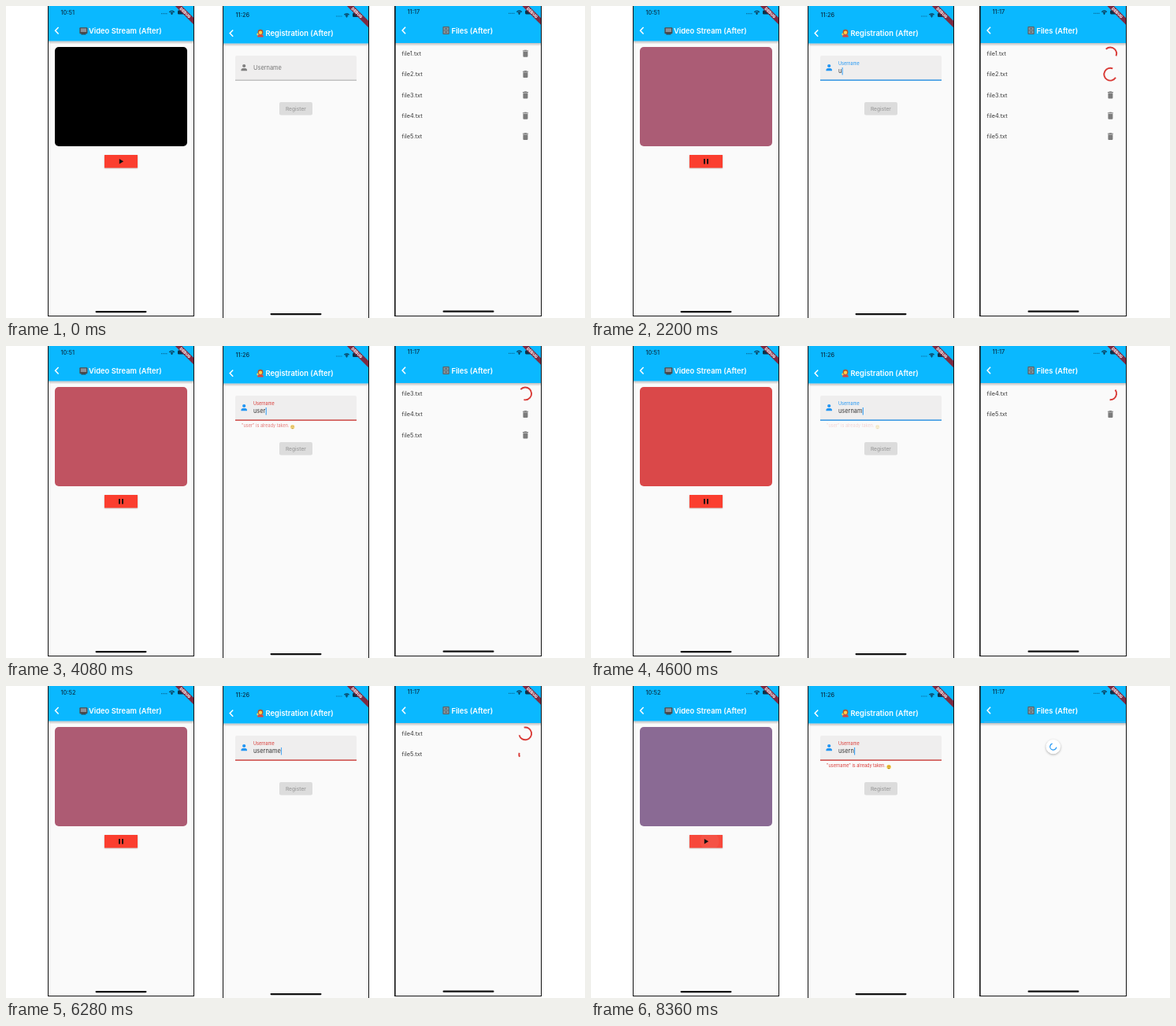
An HTML page with a canvas for the animation above (8.4 s loop, 735 px wide and 396 px high).

```html
<!DOCTYPE html>
<html lang="en">
<head>
<meta charset="utf-8">
<title>Three app screens</title>
<style>
html, body { margin: 0; width: 100%; height: 100%; overflow: hidden; background: #fff; }
canvas { display: block; width: 735px; height: 396px; }
</style>
</head>
<body>
<canvas id="stage"></canvas>
<script>
const W = 735, H = 396, LOOP = 8400;
const TAU = Math.PI * 2;
const BAR = '#0ab8ff', BLUE = '#2196f3', RED = '#d93a36', INK = '#0b3149';
const canvas = document.getElementById('stage');
const g = canvas.getContext('2d');
const dpr = window.devicePixelRatio || 1;
canvas.width = W * dpr;
canvas.height = H * dpr;

const clamp = (v, a = 0, b = 1) => Math.min(b, Math.max(a, v));
const mix = (a, b, k) => a + (b - a) * k;
const ramp = (t, from, to) => clamp((t - from) / (to - from));
const smooth = k => k * k * (3 - 2 * k);
const window01 = (t, from, to, fade) => Math.min(ramp(t, from, from + fade), 1 - ramp(t, to, to + fade));

// cubic-bezier(.4, 0, .2, 1)
function ease(x) {
  let lo = 0, hi = 1;
  for (let i = 0; i < 20; i++) {
    const s = (lo + hi) / 2;
    const bx = 1.2 * s * (1 - s) ** 2 + .6 * s * s * (1 - s) + s ** 3;
    if (bx < x) lo = s; else hi = s;
  }
  return 3 * lo * lo * (1 - lo) + lo ** 3;
}

function rect(x, y, w, h, color, r = 0) {
  g.fillStyle = color;
  g.beginPath();
  g.roundRect(x, y, w, h, r);
  g.fill();
}

function disc(x, y, r, color) {
  g.fillStyle = color;
  g.beginPath();
  g.arc(x, y, r, 0, TAU);
  g.fill();
}

function poly(points, color) {
  g.fillStyle = color;
  g.beginPath();
  points.forEach(([x, y]) => g.lineTo(x, y));
  g.closePath();
  g.fill();
}

function text(s, x, y, size, color, weight = 400, align = 'left') {
  g.font = `${weight} ${size}px Inter, Roboto, sans-serif`;
  g.textAlign = align;
  g.textBaseline = 'alphabetic';
  g.fillStyle = color;
  g.fillText(s, x, y);
  return g.measureText(s).width;
}

function withAlpha(a, draw) {
  if (a <= 0) return;
  g.save();
  g.globalAlpha *= a;
  draw();
  g.restore();
}

// Material indeterminate progress ring
function spinner(x, y, r, width, color, age) {
  const u = (age / 1333) % 1, arc = Math.PI * 1.5;
  const head = ease(clamp(u * 2)) * arc;
  const tail = ease(clamp(u * 2 - 1)) * arc;
  const start = -Math.PI / 2 + tail + age / 2222 * TAU + u * Math.PI / 2;
  g.strokeStyle = color;
  g.lineWidth = width;
  g.beginPath();
  g.arc(x, y, r, start, start + Math.max(head - tail, .01));
  g.stroke();
}

function tvIcon(x, y) {
  rect(x, y + 1, 10, 8, '#4b4a4d', 1);
  rect(x + 1.4, y + 2.2, 7.2, 4.6, '#8b9097');
  rect(x + 2, y + 9, 6, 1.2, '#39393b');
}

function personIcon(x, y) {
  disc(x + 5, y + 3.6, 3.4, '#b5532b');
  disc(x + 5, y + 4.2, 2.2, '#ffcf4a');
  rect(x + 1.4, y + 6.6, 7.2, 3.4, '#d9473f', [2, 2, 0, 0]);
  rect(x + .4, y + 5, 2, 2.6, '#ffcf4a', 1);
}

function cabinetIcon(x, y) {
  rect(x + .6, y, 8.4, 10, '#55626a', 1);
  rect(x + 1.8, y + 1.2, 6, 3.4, '#8c9aa1');
  rect(x + 1.8, y + 5.4, 6, 3.4, '#8c9aa1');
  rect(x + 3.6, y + 2.4, 2.4, 1, '#39444a');
  rect(x + 3.6, y + 6.6, 2.4, 1, '#39444a');
}

function phone(p, body) {
  const { x, w, bottom, bar, dy } = p;
  g.save();
  g.beginPath();
  g.rect(x, 0, w, bottom);
  g.clip();
  rect(x, 0, w, bottom, '#fafafa');
  body();

  const shade = g.createLinearGradient(0, bar, 0, bar + 4);
  shade.addColorStop(0, 'rgba(0,0,0,.24)');
  shade.addColorStop(1, 'rgba(0,0,0,0)');
  rect(x, bar, w, 4, shade);
  rect(x, 0, w, bar, BAR);

  text(p.clock, x + 16.5, 10.5 + dy, 7.4, INK, 500);
  const right = x + w;
  for (let i = 0; i < 4; i++) rect(right - 42 + i * 2.1, 9 + dy, 1.2, 1.2, 'rgba(11,49,73,.55)');
  g.strokeStyle = INK;
  g.lineWidth = 1.2;
  for (const r of [2.2, 4.2]) {
    g.beginPath();
    g.arc(right - 28.5, 10.6 + dy, r, -Math.PI * .77, -Math.PI * .23);
    g.stroke();
  }
  disc(right - 28.5, 10.2 + dy, .9, INK);
  rect(right - 21, 5.6 + dy, 10, 5, INK, 1.3);

  g.strokeStyle = '#fff';
  g.lineWidth = 1.5;
  g.beginPath();
  g.moveTo(p.back + 4.6, 27 + dy);
  g.lineTo(p.back + .6, 31.2 + dy);
  g.lineTo(p.back + 4.6, 35.4 + dy);
  g.stroke();
  p.icon(p.titleX - 11.6, 26.2 + dy);
  text(p.title, p.titleX, 34.7 + dy, 9.35, '#fff', 600);

  g.save();
  g.translate(p.ribbon + 8.5, 8.5);
  g.rotate(Math.PI / 4);
  rect(-30, -3, 60, 6, '#7d2b42');
  text('DEBUG', 0, 1.8, 5, '#fff', 800, 'center');
  g.restore();

  rect(p.home, p.homeY, 65, 2.2, '#111', 1.1);
  g.restore();

  rect(x, 0, p.edge, bottom, '#111');
  rect(right - 1, 0, 1, bottom, '#111');
  rect(x, bottom - 1, w, 1, '#111');
}

// Video stream: tap intervals and tint between purple (0) and red (1)
const taps = [[1120, 1400], [2320, 2480], [3110, 3400], [7980, 8160]];
const tint = [[1480, 1], [2480, .22], [3400, .22], [4650, .9], [5700, 0], [7050, 1], [8160, 0], [8400, 0]];

function videoColor(t) {
  if (t < tint[0][0]) return '#000';
  const i = tint.findIndex(k => k[0] > t);
  const [a, b] = [tint[i - 1], tint[i]];
  const k = mix(a[1], b[1], smooth(ramp(t, a[0], b[0])));
  return `rgb(${mix(138, 227, k)},${mix(106, 68, k)},${mix(148, 64, k)})`;
}

function video(t) {
  rect(62, 52, 168, 126, videoColor(t), 5);
  const tap = taps.find(([a, b]) => t >= a && t < b + 260);
  const press = tap ? window01(t, tap[0], tap[1], 120) : 0;
  g.save();
  g.shadowColor = `rgba(0,0,0,${mix(.28, .42, press)})`;
  g.shadowBlur = mix(2, 5, press) * dpr;
  g.shadowOffsetY = mix(.8, 2.6, press) * dpr;
  rect(125, 189, 42, 16.5, '#fb3e2f');
  g.restore();
  if (tap) {
    const fade = 1 - ramp(t, tap[1], tap[1] + 260);
    g.save();
    g.beginPath();
    g.rect(125, 189, 42, 16.5);
    g.clip();
    rect(125, 189, 42, 16.5, `rgba(205,165,165,${.4 * fade})`);
    disc(150.5, 197, 4 + 8 * ramp(t, tap[0], tap[0] + 230), `rgba(210,190,185,${.36 * fade})`);
    g.restore();
  }
  const playing = taps.filter(k => t >= k[1]).length % 2;
  if (playing) {
    rect(143, 194, 2, 6.6, '#111');
    rect(147, 194, 2, 6.6, '#111');
  } else poly([[143.8, 194], [149.2, 197.3], [143.8, 200.6]], '#111');
}

// Registration: [time, typed text]
const typing = [
  [1000, ''], [1720, 'u'], [2360, ''], [3200, 'u'], [3360, 'us'], [3500, 'use'], [3640, 'user'],
  [4320, 'usern'], [4440, 'userna'], [4560, 'usernam'], [4760, 'username'],
  [8080, 'usernam'], [8190, 'userna'], [8300, 'usern']
];
const errors = [
  [2460, 3560, 'Username cannot be empty'],
  [3980, 4480, '"user" is already taken.', true],
  [6280, 9000, '"username" is already taken.', true]
];
const checks = [[3620, 3980], [5050, 6280]];

function registration(t) {
  const focus = smooth(ramp(t, 1000, 1180));
  const error = errors.find(e => t >= e[0] && t < e[1] + 160);
  const failed = error && t < error[1];
  const accent = failed ? RED : BLUE;

  rect(291, 63, 154, 31.5, '#efeeee', [2, 2, 0, 0]);
  rect(291, 93.8, 154, .8, '#8f8f8f');
  withAlpha(focus, () => rect(291, 93.4, 154, 1.4, accent));

  const person = focus > .5 ? BLUE : '#818181';
  disc(302.2, 76, 2.1, person);
  rect(298.4, 79, 7.6, 3.3, person, [2.6, 2.6, 0, 0]);

  const label = focus < .5 ? '#777' : accent;
  text('Username', 314, mix(80.9, 75, focus), mix(7.4, 5.5, focus), label);

  const key = typing.filter(k => k[0] <= t).pop();
  if (key) {
    const width = text(key[1], 314, 85, 7.4, '#383838');
    const beat = (t - key[0]) % 1000;
    withAlpha(1 - ramp(beat, 450, 800) * .85, () => rect(314.3 + width, 78, 1, 9.4, BLUE));
  }
  const check = checks.find(c => t >= c[0] && t < c[1]);
  if (check) spinner(433.2, 82, 3.7, 1.5, BLUE, t - check[0]);

  if (error) withAlpha(window01(t, error[0], error[1], 150), () => {
    const width = text(error[2], 299, 103 + 2 * 0.1, 5.5, RED);
    if (error[3]) {
      const x = 299 + width + 4.2;
      disc(x, 102.8, 2.7, '#f3c63f');
      rect(x - 1.4, 101.6, .8, 1, '#6b4a16');
      rect(x + .6, 101.6, .8, 1, '#6b4a16');
      rect(x - 1, 104, 2, .6, '#6b4a16');
    }
  });

  rect(347, 122, 42, 16.6, '#dcdcdc', 2);
  text('Register', 367.9, 132.8, 6.6, '#9c9c9c', 500, 'center');
}

// Files: time each row is tapped; it goes away after REMOVE ms
const deleted = [1320, 1675, 2330, 4370, 4813];
const REMOVE = 2120, REFRESH = 7930;

function trash(x, y) {
  const c = '#7c7c7c';
  rect(x - 3.5, y - 4, 7, 1.1, c);
  rect(x - 1.7, y - 4.6, 3.4, 1, c);
  rect(x - 3, y - 2.4, 6, 6.8, c, [0, 0, 1, 1]);
}

function files(t) {
  let row = 0;
  deleted.forEach((tap, i) => {
    if (t >= tap + REMOVE) return;
    const y = 60.4 + 26.3 * row++;
    text(`file${i + 1}.txt`, 502.6, y + 2.6, 7.3, '#3c3c3c');
    if (t < tap) trash(659.4, y);
    else spinner(659.2, y, 7.9, 1.9, RED, t - tap);
  });
  const pull = smooth(ramp(t, REFRESH - 280, REFRESH + 120));
  if (pull > 0) {
    const y = mix(36, 77, pull);
    g.save();
    g.shadowColor = 'rgba(0,0,0,.3)';
    g.shadowBlur = 3 * dpr;
    g.shadowOffsetY = dpr;
    disc(586.8, y, 9.3, '#fff');
    g.restore();
    spinner(586.8, y, 4.1, 1.2, BLUE, Math.max(0, t - REFRESH));
  }
}

const phones = [
  { x: 53, w: 186, bottom: 394, bar: 44.5, dy: 0, edge: 1, back: 62, titleX: 105, ribbon: 219,
    home: 113.5, homeY: 387, icon: tvIcon, title: 'Video Stream (After)', draw: video },
  { x: 275, w: 186, bottom: 397, bar: 47.5, dy: 3.4, edge: 1, back: 283.6, titleX: 329.6, ribbon: 437,
    home: 335.5, homeY: 390, icon: personIcon, title: 'Registration (After)', clock: '11:26', draw: registration },
  { x: 493, w: 187, bottom: 394, bar: 47, dy: -.2, edge: 1.6, back: 502.5, titleX: 565.4, ribbon: 659.5,
    home: 554.5, homeY: 386.6, icon: cabinetIcon, title: 'Files (After)', clock: '11:17', draw: files }
];

function paint(t) {
  g.setTransform(dpr, 0, 0, dpr, 0, 0);
  rect(0, 0, W, H, '#fff');
  phones[0].clock = t < 5000 ? '10:51' : '10:52';
  phones.forEach(p => phone(p, () => p.draw(t)));
  withAlpha(ramp(t, REFRESH - 200, REFRESH), () => rect(499, 45, 180, 1.6, '#3fb2ee'));
}

let begin;
function frame(now) {
  begin ??= now;
  paint((now - begin) % LOOP);
  requestAnimationFrame(frame);
}
paint(0);
requestAnimationFrame(frame);
</script>
</body>
</html>
```
